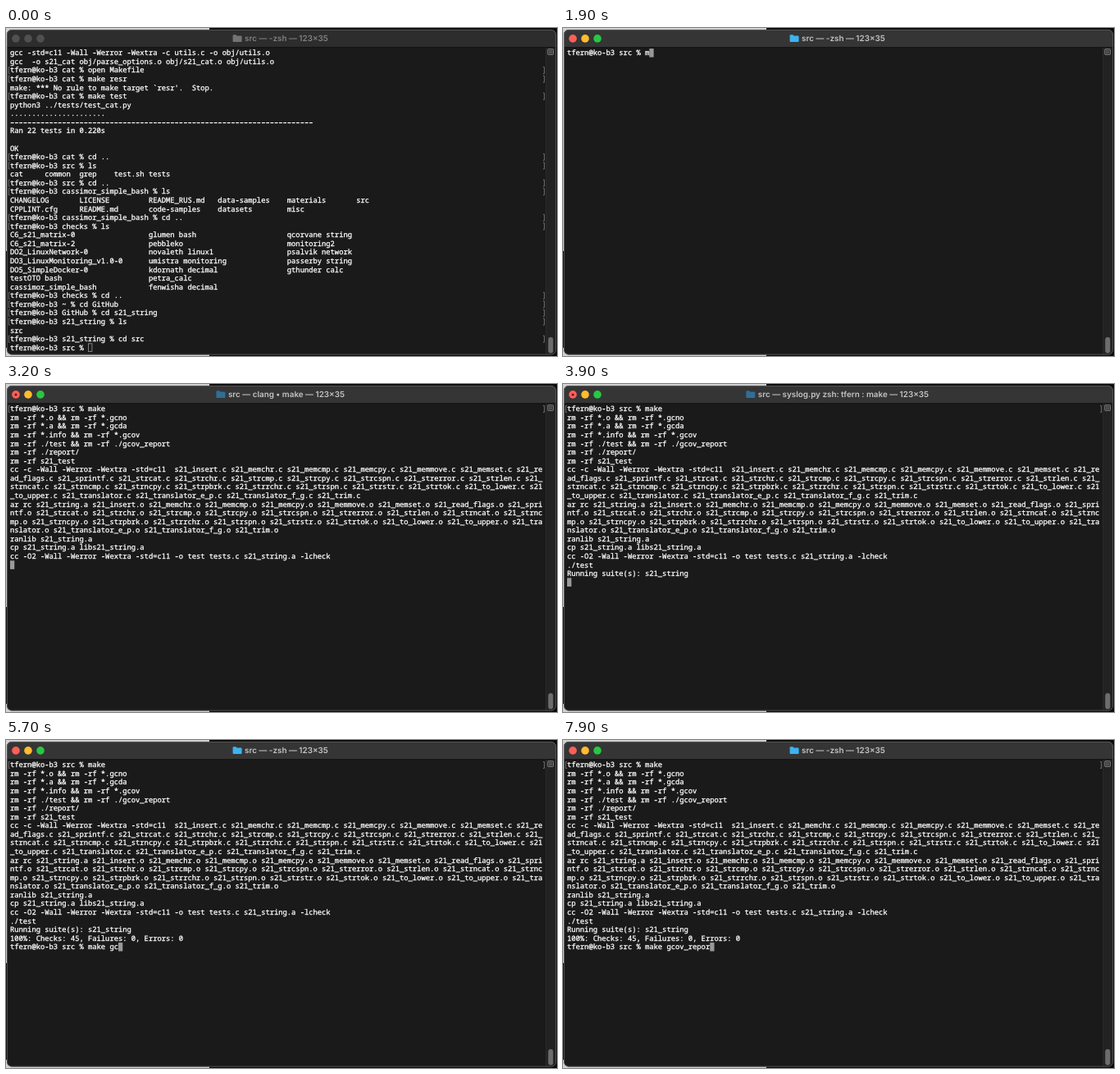
An HTML page for the animation above (8000 ms loop, 672 px wide and 400 px high).

```html
<!DOCTYPE html>
<html lang="en">
<head>
<meta charset="utf-8">
<title>Terminal session</title>
<style>
  html, body { margin: 0; width: 672px; height: 400px; overflow: hidden; background: #0b0b0b; }
  svg { display: block; }
  text { white-space: pre; text-rendering: geometricPrecision; }
  #lines {
    font: 8.8px "Noto Sans Mono", "DejaVu Sans Mono", monospace;
    fill: #fff; stroke: #fff; stroke-width: .3; stroke-linejoin: round;
  }
  #title { font: 600 9.9px Inter, "Liberation Sans", sans-serif; text-anchor: middle; }
  #brackets { fill: none; stroke: #808080; stroke-width: .8; }
</style>
</head>
<body>
<svg width="672" height="400" viewBox="0 0 672 400">
  <path d="M0 0H248V8H0zM0 0H6V272H0zM0 390H248V400H0z" fill="#d2d2d2"/>
  <rect x="1" y="2" width="670" height="396.5" rx="6" fill="#1a1a1a"/>
  <path id="bar" d="M1 23.5V8a6 6 0 0 1 6-6H665a6 6 0 0 1 6 6V23.5z"/>
  <path d="M1 23.7H671" stroke="#0c0c0c" stroke-width=".8"/>
  <path d="M658.5 24H670.5V392a6 6 0 0 1-6 6H658.5z" fill="#222"/>
  <path d="M658.5 24V398" stroke="#303030" stroke-width=".7"/>
  <rect x="1.4" y="2.4" width="669.2" height="395.8" rx="5.7" fill="none" stroke="#626262" stroke-width=".8"/>
  <g fill="none" stroke="#a0a0a0" stroke-width=".8">
    <rect x="660.8" y="25.8" width="6.6" height="6.6" rx=".6"/>
    <path d="M662 28H666.2M662 30.2H666.2"/>
  </g>
  <rect x="661.3" y="377" width="6" height="19.5" rx="3" fill="#6d6d6d"/>
  <g id="lights">
    <circle cx="12" cy="12.9" r="4.8"/>
    <circle cx="27" cy="12.9" r="4.8"/>
    <circle cx="42" cy="12.9" r="4.8"/>
  </g>
  <circle id="busyDot" cx="12" cy="12.9" r="1.5" fill="#6b0f0c"/>
  <path id="folder" d="M0 1.3Q0 .2 1 .2H3.8L5 1.4H10Q11 1.4 11 2.4V8Q11 9 10 9H1Q0 9 0 8z"/>
  <text id="title" x="342" y="16.3"></text>
  <g id="brackets"></g>
  <rect id="cursor" width="5.28" height="10.5"/>
  <g id="lines"></g>
</svg>
<script>
const LOOP = 8000, COLS = 123, CELL_W = 5.28, CELL_H = 10.57, LEFT = 5, TOP = 25.1;
const el = id => document.getElementById(id);

const USER = "tfern", HOME_DIR = "cassimor_simple_bash";
const prompt = (dir, cmd = "") => `${USER}@ko-b3 ${dir} % ${cmd}`;
const columns = (width, ...cells) => cells.map(c => c.padEnd(width)).join("").trimEnd();
const wrap = s => s.match(new RegExp(`.{1,${COLS}}`, "g"));

const history = [
  "gcc -std=c11 -Wall -Werror -Wextra -c utils.c -o obj/utils.o",
  "gcc  -o s21_cat obj/parse_options.o obj/s21_cat.o obj/utils.o",
  prompt("cat", "open Makefile"),
  prompt("cat", "make resr"),
  "make: *** No rule to make target `resr'.  Stop.",
  prompt("cat", "make test"),
  "python3 ../tests/test_cat.py",
  ".".repeat(22),
  "–".repeat(70),
  "Ran 22 tests in 0.220s",
  "",
  "OK",
  prompt("cat", "cd .."),
  prompt("src", "ls"),
  columns(8, "cat", "common", "grep", "test.sh", "tests"),
  prompt("src", "cd .."),
  prompt(HOME_DIR, "ls"),
  columns(16, "CHANGELOG", "LICENSE", "README_RUS.md", "data-samples", "materials", "src"),
  columns(16, "CPPLINT.cfg", "README.md", "code-samples", "datasets", "misc"),
  prompt(HOME_DIR, "cd .."),
  prompt("checks", "ls"),
  columns(32, "C6_s21_matrix-0", "glumen bash", "qcorvane string"),
  columns(32, "C6_s21_matrix-2", "pebbleko", "monitoring2"),
  columns(32, "DO2_LinuxNetwork-0", "novaleth linux1", "psalvik network"),
  columns(32, "DO3_LinuxMonitoring_v1.0-0", "umistra monitoring", "passerby string"),
  columns(32, "DO5_SimpleDocker-0", "kdornath decimal", "gthunder calc"),
  columns(32, "testOTO bash", "petra_calc"),
  columns(32, HOME_DIR, "fenwisha decimal"),
  prompt("checks", "cd .."),
  prompt("~", "cd GitHub"),
  prompt("GitHub", "cd s21_string"),
  prompt("s21_string", "ls"),
  "src",
  prompt("s21_string", "cd src")
];

const modules = ("insert memchr memcmp memcpy memmove memset read_flags sprintf strcat strchr strcmp " +
  "strcpy strcspn strerror strlen strncat strncmp strncpy strpbrk strrchr strspn strstr strtok " +
  "to_lower to_upper translator translator_e_p translator_f_g trim").split(" ");
const files = ext => modules.map(m => `s21_${m}.${ext}`).join(" ");

const compile = [
  prompt("src", "make"),
  "rm -rf *.o && rm -rf *.gcno",
  "rm -rf *.a && rm -rf *.gcda",
  "rm -rf *.info && rm -rf *.gcov",
  "rm -rf ./test && rm -rf ./gcov_report",
  "rm -rf ./report/",
  "rm -rf s21_test",
  ...wrap("cc -c -Wall -Werror -Wextra -std=c11  " + files("c"))
];
const link = [
  ...compile,
  ...wrap("ar rc s21_string.a " + files("o")),
  "ranlib s21_string.a",
  "cp s21_string.a libs21_string.a",
  "cc -O2 -Wall -Werror -Wextra -std=c11 -o test tests.c s21_string.a -lcheck"
];
const testRun = [...link, "./test", "Running suite(s): s21_string"];
const finished = [...testRun, "100%: Checks: 45, Failures: 0, Errors: 0"];

// Screens: start time, lines above the cursor line, shell prompt on the cursor line or not
const screens = [
  [0, history, true], [1600, [], true], [2400, compile, false],
  [3200, link, false], [3900, testRun, false], [4000, finished, true]
];
const typing = [
  [0, ""], [600, "c"], [900, "cl"], [1100, "cle"], [1300, "clea"], [1500, "clear"],
  [1600, ""], [1900, "m"], [2000, "ma"], [2100, "mak"], [2200, "make"],
  [2400, ""], [4800, "m"], [4900, "mak"], [5000, "make"], [5200, "make "],
  [5400, "make g"], [5700, "make gc"], [6000, "make gco"], [6100, "make gcov"],
  [6600, "make gcovr"], [7000, "make gcov"], [7200, "make gcov_"], [7400, "make gcov_r"],
  [7600, "make gcov_re"], [7700, "make gcov_rep"], [7800, "make gcov_repo"], [7900, "make gcov_repor"]
];
const titles = [
  [0, "-zsh"], [2500, "clang • make"], [3900, `syslog.py zsh: ${USER} : make`], [4000, "-zsh"]
];
const at = (track, t) => track.findLast(step => step[0] <= t);

function drawLines(rows) {
  el("lines").innerHTML = rows.map((row, i) => {
    const safe = row.replace(/&/g, "&amp;");
    return `<text x="${LEFT}" y="${(TOP + 8.2 + i * CELL_H).toFixed(2)}">${safe}</text>`;
  }).join("");
}

function drawBrackets(rows) {
  el("brackets").innerHTML = rows.map((row, i) => {
    if (!row.startsWith(USER + "@")) return "";
    const y = (TOP + 1.4 + i * CELL_H).toFixed(2);
    return `<path d="M4.8 ${y}h-1.5v8h1.5M655 ${y}h1.5v8h-1.5"/>`;
  }).join("");
}

function drawTitle(name, active, busy) {
  const title = el("title");
  title.textContent = `src — ${name} — 123×35`;
  title.setAttribute("fill", active ? "#c4c4c4" : "#808080");
  const x = 342 - title.getComputedTextLength() / 2 - 14.5;
  el("folder").setAttribute("transform", `translate(${x} 8)`);
  el("folder").setAttribute("fill", !active ? "#737373" : busy ? "#2f6f97" : "#3db2f0");
  el("bar").setAttribute("fill", active ? "#353536" : "#2d2d2d");
  const colors = active ? ["#fe5f57", "#febc2e", "#28c840"] : Array(3).fill("#505050");
  [...el("lights").children].forEach((c, i) => c.setAttribute("fill", colors[i]));
  el("busyDot").setAttribute("visibility", busy ? "visible" : "hidden");
}

function drawCursor(col, row, active) {
  const inset = active ? 0 : .4;
  const attrs = {
    x: LEFT + col * CELL_W + inset, y: TOP + row * CELL_H + inset,
    width: CELL_W - 2 * inset, height: 10.5 - 2 * inset,
    fill: active ? "#999" : "none", stroke: active ? "none" : "#999", "stroke-width": .8
  };
  for (const [name, value] of Object.entries(attrs)) el("cursor").setAttribute(name, value);
}

let shown = "";
function render(t) {
  const [start, rows, ready] = at(screens, t);
  const typed = at(typing, t)[1], name = at(titles, t)[1];
  const active = t >= 100;
  const key = [start, typed, name, active].join("|");
  if (key === shown) return;
  shown = key;
  const current = ready ? prompt("src", typed) : "";
  drawLines([...rows, current]);
  drawBrackets(rows);
  drawTitle(name, active, name !== "-zsh");
  drawCursor(current.length, rows.length, active);
}

function frame() {
  render(performance.now() % LOOP);
  requestAnimationFrame(frame);
}
frame();
</script>
</body>
</html>
```
